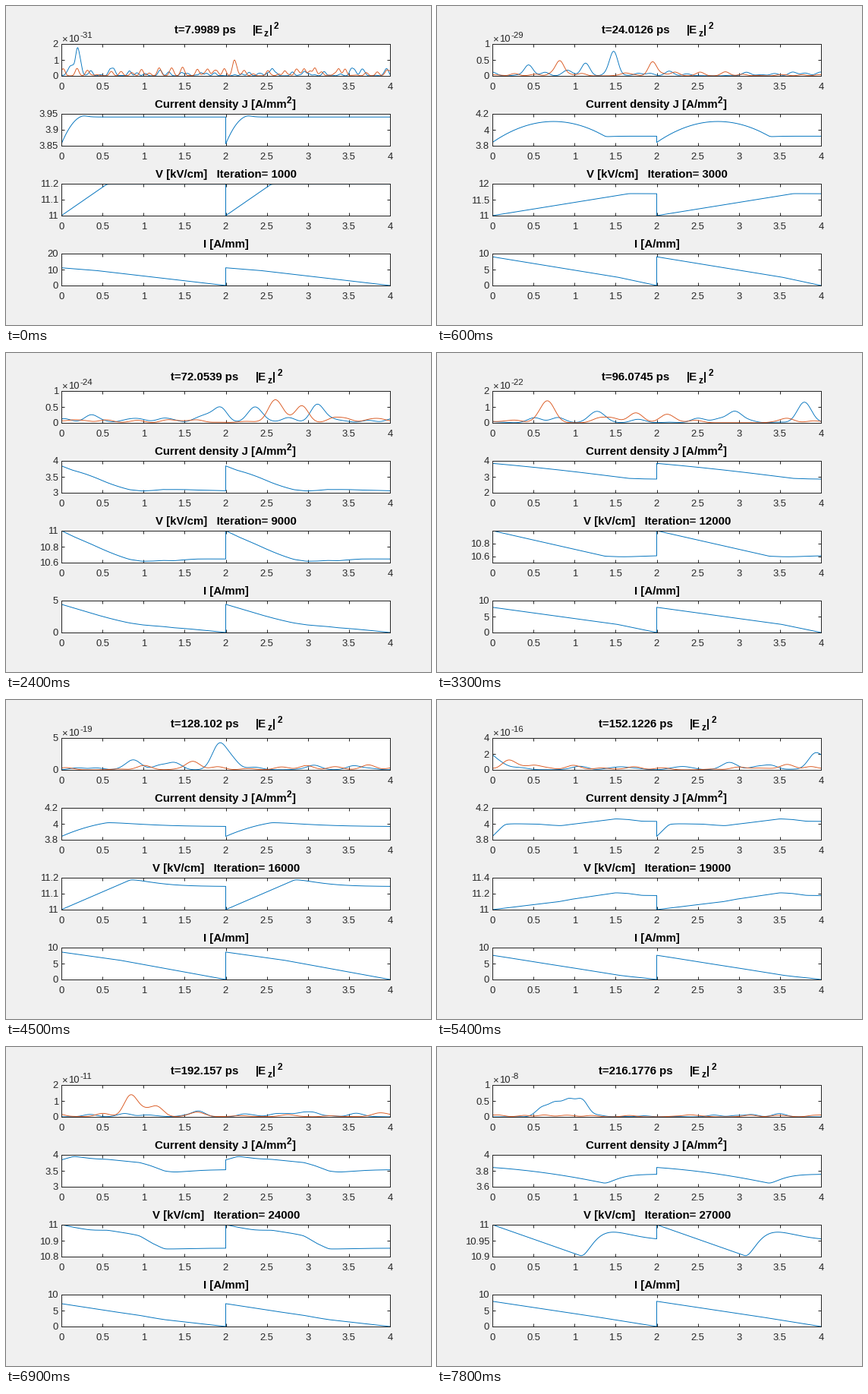
A matplotlib script that plays this animation: 560 by 420 pixels, repeating every 8000 ms.

```python
import numpy as np
import matplotlib.pyplot as plt
from matplotlib.animation import FuncAnimation

W, H, PT = 560, 420, 0.72
BLUE, RED, DARK = "#0072bd", "#d95319", "#262626"
FRAMES, INTERVAL, HOLD, LAST = 80, 100, 3, 26
DT = 0.008006874           # ps per iteration
WAVE_STEP = 0.5525         # mm the voltage front travels per picture
LIGHT_STEP = 0.67          # mm the light travels per picture
I_DELAY, J_DELAY = 0.14, 0.28   # mm behind the voltage front
IMPEDANCE, BIAS = 0.2, 11

plt.rcParams["font.family"] = "Liberation Sans"
rng = np.random.default_rng(4)

z = np.linspace(0, 2, 401)
s = np.linspace(-2, 2, 801)
ring = np.linspace(0, 4, 1601)


def smooth(y, win=17):
    """Blur a profile while keeping both end values."""
    h = win // 2
    y = np.r_[2 * y[0] - y[h:0:-1], y, 2 * y[-1] - y[-2:-h - 2:-1]]
    kernel = np.hanning(win + 2)[1:-1]
    return np.convolve(y, kernel / kernel.sum(), "valid")


def fold(distance):
    """Place of a front that bounces between 0 and 2."""
    return abs((distance + 2) % 4 - 2)


def profile(knee, start, front, end, kick=0, tau=0.2, bow=0):
    """A bowed ramp up to the front, then a damped return to the end value."""
    p = np.minimum(z / knee, 1)
    u = np.maximum(z - knee, 0) / tau
    gap = front - end
    ramp = start + (front - start) * p + 4 * bow * p * (1 - p)
    return smooth(ramp - gap + np.exp(-u) * (gap * (1 + u) + kick * u * u))


def pulses(peaks, level, sigma):
    """Main peaks on top of evenly spread random ripples."""
    count = int(4 / (3 * sigma))
    places = (np.arange(count) + rng.uniform(0, 1, count)) * 4 / count
    ripples = zip(places, level * rng.uniform(0, 1, count) ** 2)
    y = np.zeros_like(ring)
    for pos, height in [*peaks.items(), *ripples]:
        d = (ring - pos + 2) % 4 - 2
        y += height * np.exp(-0.5 * (d / sigma) ** 2)
    return y


def tail(J):
    """Integral of J from each position to the open end."""
    c = np.r_[0, np.cumsum((J[1:] + J[:-1]) / 2)] * (z[1] - z[0])
    return c[-1] - c


def steady_J(V):
    return np.interp(V, [10.6, 10.8, 11, 11.3, 11.7],
                     [2.85, 3.35, 3.84, 4.1, 3.92])


def key(step, exponent, level, sigma, blue, red, V, J, I):
    d = WAVE_STEP * (step + 1)
    V = profile(fold(d), BIAS, **V)
    J = profile(fold(d - J_DELAY), **{"start": 3.842, **J})
    I = smooth(np.interp(z, [0, fold(d - I_DELAY), 2], [*I, 0]))
    extra = IMPEDANCE * (I - tail(J))
    right, left = V - BIAS + extra, V - BIAS - extra
    return dict(step=step, exponent=exponent,
                blue=pulses(blue, level, sigma),
                red=pulses(red, level, sigma),
                wave=np.r_[-left[:0:-1], right], lag=J - steady_J(V))


keys = [
    key(0, -31, 0.5, 0.022,
        blue={.14: .5, .19: 1.1, .23: .7}, red={2.1: .8},
        V=dict(front=11.197, end=11.197),
        J=dict(start=3.856, front=3.944, end=3.94, tau=.03, bow=.02),
        I=(11.1, 9.45)),
    key(2, -29, 0.14, 0.05,
        blue={.43: .25, 1.14: .3, 1.48: .68}, red={.82: .46, 1.95: .44},
        V=dict(front=11.69, end=11.685),
        J=dict(front=3.914, end=3.92, tau=.05, bow=.225),
        I=(9, 2.65)),
    key(6, -26, 0.6, 0.08,
        blue={.6: 1.9, 1.03: 1.5, 1.77: 2.3, 3.02: 1},
        red={.27: 1.8, 3.93: 2.4},
        V=dict(front=11.08, end=11.098, kick=.14, tau=.22),
        J=dict(front=4.08, end=4.095, kick=.02, tau=.25, bow=.02),
        I=(4.2, 3.25)),
    key(11, -22, 0.35, 0.085,
        blue={1.3: .45, 2.95: .7, 3.8: 1}, red={.68: 1.2, 1.75: .6, 2.12: .5},
        V=dict(front=10.6, end=10.616, kick=-.03, tau=.15),
        J=dict(front=2.9, end=2.855, tau=.08, bow=.05),
        I=(7.9, 2.6)),
    key(15, -19, 0.8, 0.085,
        blue={.85: 1, 1.38: 1, 1.92: 3.7, 2.07: 1.6}, red={1.6: 1.3},
        V=dict(front=11.187, end=11.145),
        J=dict(front=4.014, end=3.965, tau=.3, bow=.02),
        I=(8.6, 6.1)),
    key(21, -13, 0.35, 0.08,
        blue={.32: .4, 2.25: .35}, red={2.18: 2.1, 2.34: .6, 2.5: 1},
        V=dict(front=10.923, end=10.973, tau=.3),
        J=dict(front=3.888, end=3.846, kick=-.07, tau=.22),
        I=(6.5, 6.45)),
    key(26, -8, 0.1, 0.075,
        blue={.6: .25, .76: .38, .93: .48, 1.09: .5}, red={2.4: .06},
        V=dict(front=10.902, end=10.95, kick=.079, tau=.15),
        J=dict(front=3.645, end=3.757, tau=.1, bow=.025),
        I=(7.9, 3.2)),
]
steps = [k["step"] for k in keys]


def travel(wave, distance):
    """Move a wave along the line; it flips sign after each round trip."""
    q = s - distance
    turns = np.floor((q + 2) / 4)
    return np.interp(q - 4 * turns, s, wave) * (-1.0) ** turns


def orbit(y, distance):
    return np.interp((ring - distance) % 4, ring, y)


def state(step):
    k = min(np.searchsorted(steps, step, side="right") - 1, len(keys) - 2)
    a, b = keys[k], keys[k + 1]
    da, db = step - a["step"], step - b["step"]
    u = da / (da - db)

    def mix(p, q):
        return (1 - u) * p + u * q

    wave = mix(travel(a["wave"], WAVE_STEP * da),
               travel(b["wave"], WAVE_STEP * db))
    right, left = wave[400:], -wave[400::-1]
    V = BIAS + (right + left) / 2
    J = steady_J(V) + mix(a["lag"], b["lag"])
    I = np.maximum((right - left) / (2 * IMPEDANCE) + tail(J), 0)
    power = 10 ** mix(a["exponent"], b["exponent"])
    light = [power * mix(orbit(a[c], way * LIGHT_STEP * da),
                         orbit(b[c], way * LIGHT_STEP * db))
             for c, way in (("blue", 1), ("red", -1))]
    return light, J, V, I


def nice_axis(lo, hi):
    """Tightest round limits that span at most two steps."""
    decade = int(np.floor(np.log10(hi - lo))) - 1
    for e in range(decade, decade + 4):
        for m in (1, 2, 5):
            step = m * 10.0 ** e
            first = np.floor(lo / step + 1e-6)
            last = np.ceil(hi / step - 1e-6)
            if last - first <= 2:
                ticks = np.arange(first, last + 1) * step
                limits = ticks[0], ticks[-1]
                if last - first == 1 and first > 0:
                    sub = 0.4 * step
                    ticks = np.arange(np.ceil(limits[0] / sub - 1e-6),
                                      limits[1] / sub - 1e-6) * sub
                return limits, ticks


fig = plt.figure(figsize=(W / 100, H / 100), dpi=100, facecolor="#f0f0f0")


def write(x, y, text, size=15, weight="bold", color="black", ha="left"):
    return fig.text(x / W, 1 - y / H, text, fontsize=size * PT, color=color,
                    weight=weight, ha=ha, va="baseline")


def panel(bottom):
    ax = fig.add_axes([73 / W, 1 - bottom / H, 433 / W, 42 / H])
    ax.set_xlim(0, 4)
    xs = np.arange(0, 4.1, 0.5)
    ax.set_xticks(xs, [f"{x:g}" for x in xs])
    ax.tick_params(direction="in", top=True, right=True, length=4.3 * PT,
                   width=PT, color=DARK, labelcolor=DARK, labelsize=13 * PT)
    ax.tick_params(axis="x", pad=8.5 * PT)
    ax.tick_params(axis="y", pad=4 * PT)
    for spine in ax.spines.values():
        spine.set(linewidth=PT, color=DARK)
    return ax


def scale(ax, lo, hi):
    limits, ticks = nice_axis(lo, hi)
    ax.set_yticks(ticks, [f"{t:.6g}" for t in ticks])
    ax.set_ylim(limits)


axes = [panel(92 * row) for row in range(1, 5)]
light_lines = [axes[0].plot([], [], color=c, lw=0.9 * PT)[0]
               for c in (BLUE, RED)]
lines = [ax.plot([], [], color=BLUE, lw=0.95 * PT)[0] for ax in axes[1:]]

time_title = write(221.5, 36, "")
field_title = [(write(x, y, t, size), x) for x, y, t, size in (
    (325, 36, "|E", 15), (340, 40, "z", 12), (346.5, 36, "|", 15),
    (353, 30, "2", 12))]
write(195.5, 134, "Current density J [A/mm")
write(370, 128.5, "2", 12)
write(377, 134, "]")
volt_title = write(290, 226, "", ha="center")
write(290, 318, "I [A/mm]", ha="center")
write(73, 47, "×", 13, "normal", DARK)
write(82.5, 47, "10", 13, "normal", DARK)
exponent_text = write(97, 42, "", 11.5, "normal", DARK)


def draw(frame):
    step = min(frame // HOLD, LAST)
    iteration = 1000 * (step + 1)
    light, *profiles = state(step)

    time = str(round((iteration - 1) * DT, 4))
    shift = 4.17 * (len(time) - 6)
    time_title.set_text(f"t={time} ps")
    time_title.set_x((221.5 - shift) / W)
    for part, x in field_title:
        part.set_x((x + shift) / W)
    volt_title.set_text(f"V [kV/cm]   Iteration= {iteration}")

    peak = max(y.max() for y in light)
    exponent = int(np.floor(np.log10(nice_axis(0, peak)[0][1]) + 1e-9))
    unit = 10.0 ** exponent
    exponent_text.set_text(f"{exponent}")
    for line, y in zip(light_lines, light):
        line.set_data(ring, y / unit)
    scale(axes[0], 0, peak / unit)

    for ax, line, y in zip(axes[1:], lines, profiles):
        line.set_data(np.r_[z, z + 2], np.r_[y, y])
        scale(ax, y.min(), y.max())
    return []


anim = FuncAnimation(fig, draw, frames=FRAMES, interval=INTERVAL,
                     repeat=True, repeat_delay=0, blit=False)
plt.show()
```
